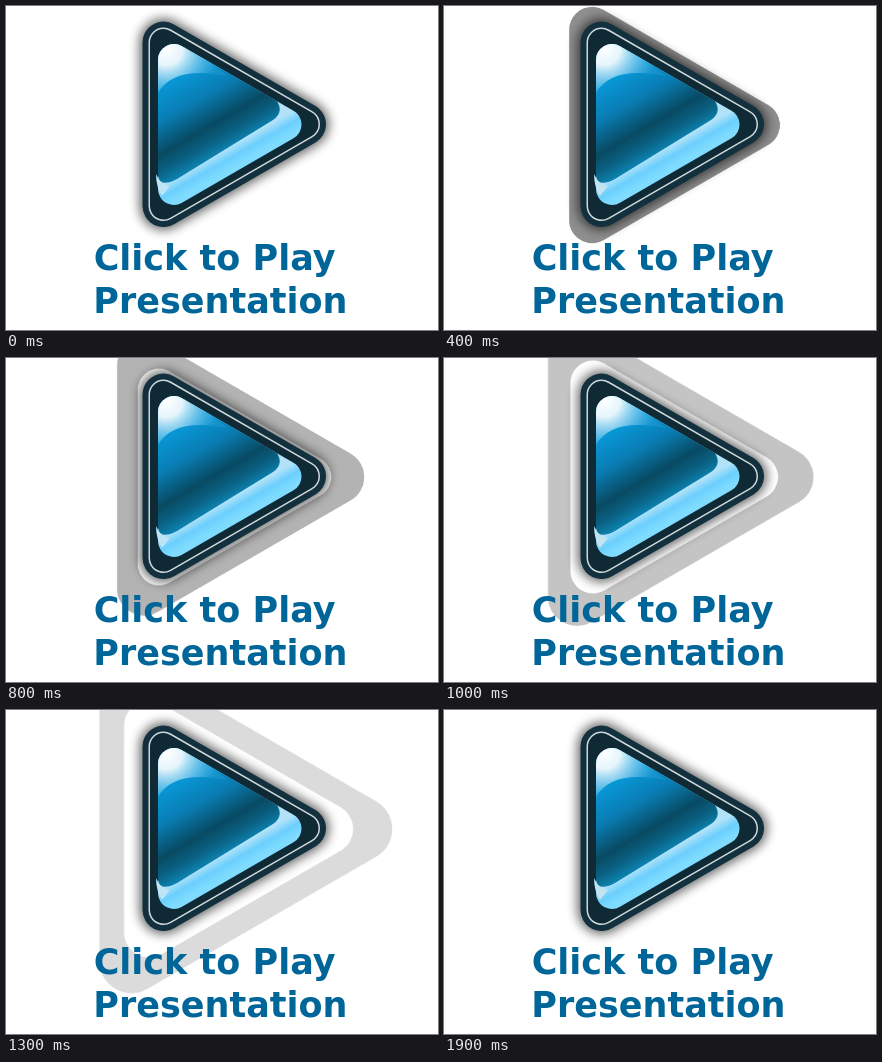
Write an HTML page that moves like this. It is 432 px wide and 324 px high and loops after 2 s.

```html
<!DOCTYPE html>
<html lang="en">
<head>
<meta charset="utf-8">
<title>Click to Play Presentation</title>
<style>
  html, body { margin: 0; width: 100%; height: 100%; overflow: hidden; background: #fff; }
  svg { display: block; width: 432px; height: 324px; }
  text { font: bold 35px "DejaVu Sans", Verdana, sans-serif; fill: #069; }
  .round { stroke-linejoin: round; }

  /* The pulse advances in 100 ms steps. */
  .pulse { animation: grow 2s steps(20) infinite, fade 2s infinite; }
  @keyframes grow {
    from { transform: scale(1); }
    to { transform: scale(2.047); }
  }
  @keyframes fade {
    0%   { opacity: .57; animation-timing-function: steps(4); }
    20%  { opacity: .443; animation-timing-function: steps(4); }
    40%  { opacity: .3; animation-timing-function: steps(2); }
    50%  { opacity: .235; animation-timing-function: steps(3); }
    65%  { opacity: .145; animation-timing-function: steps(2); }
    75%  { opacity: .094; animation-timing-function: steps(4); }
    95%, 100% { opacity: 0; }
  }
</style>
</head>
<body>
<svg viewBox="0 0 432 324">
  <defs>
    <path id="wave" class="round" d="M-48.3-78.7 88 0-48.3 78.7Z" stroke-width="38"/>
    <path id="body" class="round" d="M157.5 36.6 299 118.3 157.5 200Z"/>
    <path id="glass" class="round" d="M168 54.1 279.5 118.5 168 182.9Z" stroke-width="32"/>
    <mask id="hole" maskUnits="userSpaceOnUse" x="-90" y="-120" width="220" height="240">
      <rect x="-90" y="-120" width="220" height="240" fill="#fff"/>
      <use href="#wave" transform="scale(.782)" fill="#000" stroke="#000"/>
    </mask>
    <filter id="blur" filterUnits="userSpaceOnUse" x="90" y="-20" width="270" height="280">
      <feGaussianBlur stdDeviation="5.5"/>
    </filter>
    <linearGradient id="rim" gradientUnits="userSpaceOnUse" x1="214.5" y1="146" x2="224.5" y2="163.5">
      <stop offset="0" stop-color="#b2e2f8"/>
      <stop offset=".5" stop-color="#6bcffd"/>
      <stop offset="1" stop-color="#7fdcff"/>
    </linearGradient>
    <linearGradient id="face" gradientUnits="userSpaceOnUse" x1="152" y1="38" x2="214.5" y2="146">
      <stop offset="0" stop-color="#0a9ee0"/>
      <stop offset=".3" stop-color="#0898d8"/>
      <stop offset=".55" stop-color="#097cb2"/>
      <stop offset=".78" stop-color="#084a63"/>
      <stop offset=".9" stop-color="#0a6183"/>
      <stop offset="1" stop-color="#0c80ad"/>
    </linearGradient>
    <radialGradient id="shine" gradientUnits="userSpaceOnUse" cx="160" cy="43" r="54">
      <stop offset="0" stop-color="#fff"/>
      <stop offset=".3" stop-color="#fff" stop-opacity=".9"/>
      <stop offset="1" stop-color="#5cc0f0" stop-opacity=".15"/>
    </radialGradient>
    <clipPath id="inside">
      <path d="M152 182.9V54.1A16 16 0 0 1 176 40.2L287.5 104.6A16 16 0 0 1 287.5 132.4L176 196.8A16 16 0 0 1 152 182.9Z"/>
    </clipPath>
  </defs>

  <g transform="translate(206.5 119)">
    <g class="pulse">
      <g mask="url(#hole)"><use href="#wave" fill="#000" stroke="#000"/></g>
    </g>
  </g>

  <use href="#body" stroke="#000" stroke-width="48" opacity=".6" filter="url(#blur)"/>
  <use href="#body" fill="#12303d" stroke="#12303d" stroke-width="42"/>
  <use href="#body" stroke="#cfd8dc" stroke-width="30"/>
  <use href="#body" fill="#0f2935" stroke="#0f2935" stroke-width="27"/>
  <use href="#glass" fill="url(#rim)" stroke="url(#rim)"/>
  <path d="M150 168Q150 181 156 190L164 180Q154 178 150 168Z" fill="#bfe4f4"/>
  <g clip-path="url(#inside)">
    <path d="M152 36H180L268 91Q280 105 267 114L171 173Q154 182 152 170Z" fill="url(#face)"/>
    <path d="M150 90C160 70 182 62 222 70L180 38H150Z" fill="url(#shine)"/>
  </g>

  <text x="87.7" y="264">Click to Play</text>
  <text x="87.3" y="307">Presentation</text>
</svg>
</body>
</html>
```
